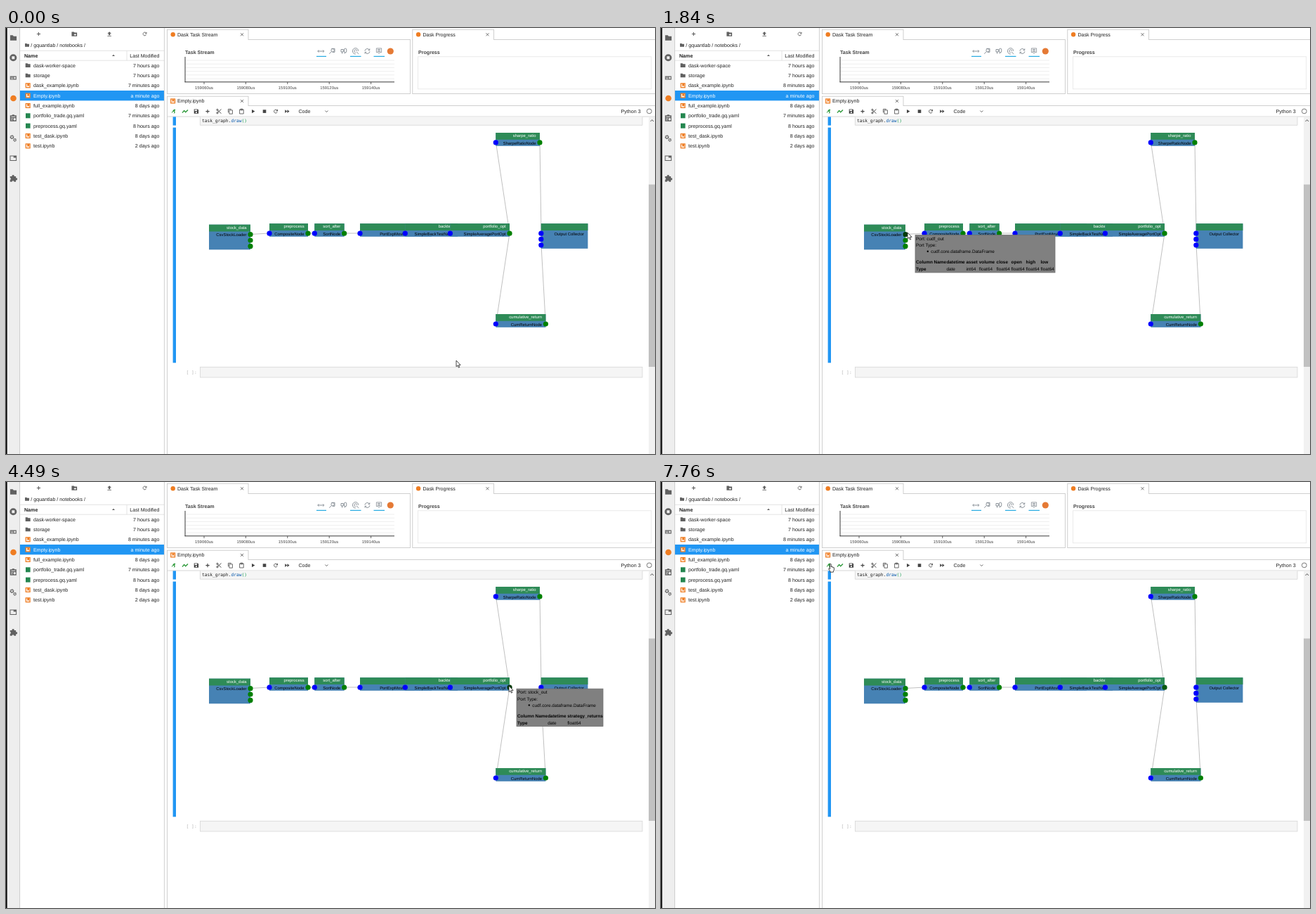
An HTML page for the animation above (8 s loop, 924x606 px).

```html
<!DOCTYPE html>
<html lang="en">
<head>
<meta charset="utf-8">
<title>Task graph notebook</title>
<style>
html, body { margin: 0; width: 100%; height: 100%; overflow: hidden; background: #fff; }
svg { display: block; width: 924px; height: 606px; }
text { font: 7.1px "Liberation Sans", Arial, sans-serif; fill: #212121; text-rendering: geometricPrecision; white-space: pre; }
.b { font-weight: bold; }
.end { text-anchor: end; }
.mono { font: 6.26px "DejaVu Sans Mono", monospace; }
.tick { font-size: 5.9px; text-anchor: middle; }
.node { font-size: 5.9px; text-anchor: end; fill: #000; }
.tip { font-size: 6.4px; fill: #000; }
</style>
</head>
<body>
<svg id="stage" viewBox="0 0 924 606" xmlns="http://www.w3.org/2000/svg"></svg>
<script>
const NS = "http://www.w3.org/2000/svg";
const stage = document.getElementById("stage");
const INK = "#616161", EDGE = "#c4c4c4", BLUE = "#2196f3", ORANGE = "#ef7d22";
const LOOP = 8000;

function el(tag, attrs, parent = stage, content) {
  const e = document.createElementNS(NS, tag);
  for (const k in attrs) e.setAttribute(k, attrs[k]);
  if (content !== undefined) e.textContent = content;
  parent.appendChild(e);
  return e;
}
const rect = (x, y, x2, y2, fill, stroke = "none", parent = stage) =>
  el("rect", { x, y, width: x2 - x, height: y2 - y, fill, stroke, "stroke-width": 0.8 }, parent);
const line = (x1, y1, x2, y2, stroke = EDGE, w = 0.8, parent = stage) =>
  el("line", { x1, y1, x2, y2, stroke, "stroke-width": w }, parent);
const dot = (cx, cy, r, fill, parent = stage) => el("circle", { cx, cy, r, fill }, parent);
const text = (x, y, s, cls = "", fill, parent = stage) =>
  el("text", fill ? { x, y, class: cls, style: "fill:" + fill } : { x, y, class: cls }, parent, s);
const group = (x, y, parent = stage) => el("g", { transform: `translate(${x} ${y})` }, parent);

// Icons are drawn around their own centre.
const icon = (x, y, d, color = INK, scale = 1, w = 0) => el("path", {
  d, transform: `translate(${x} ${y}) scale(${scale})`,
  fill: w ? "none" : color, stroke: w ? color : "none", "stroke-width": w, "fill-rule": "evenodd"
});
const FOLDER = "M-3.5-2.8H-.7L.3-1.8H3.5V2.8H-3.5Z";
const CROSS = "M-2-2 2 2M2-2-2 2";
const PLUS = "M-2.6 0H2.6M0-2.6V2.6";
const TURN = "M2.3-.8A2.4 2.4 0 1 0 2.2 1M2.5-2.6V-.6H.5";
const CARET = "M-2-1 0 1 2-1";

function notebookIcon(x, y) {
  rect(x - 2.9, y - 2.9, x + 2.9, y + 2.9, "#fff", ORANGE).setAttribute("stroke-width", 1.3);
  icon(x, y, "M-1-2.7H1.8V1.4L.4.2-1 1.4Z", ORANGE);
}

function sidebar() {
  rect(0, 0, 20, 606, "#eeeeee");
  rect(0, 0, 1.6, 606, "#000");
  line(19.6, 0, 19.6, 606);
  icon(10.5, 14, FOLDER, INK, 1.3);
  icon(10.3, 42.3, "M-5 0A5 5 0 1 1 5 0 5 5 0 1 1-5 0ZM-2-2V2H2V-2Z");
  icon(10.3, 71, "M-4.5-2.4H4.5V2.4H-4.5ZM-3.4-1.2V-.2H-2.2V-1.2ZM-1.4-1.2V-.2H-.2V-1.2ZM1-1.2V1.2H3.4V-1.2ZM-3.4.6V1.4H0V.6Z");
  dot(10.5, 100, 4.3, ORANGE);
  icon(10.3, 128.3, "M-4.5-4H-1.5V-5H1.5V-4H4.5V4.5H-4.5ZM-3-2.5V-1.5H3V-2.5ZM-3 0V1H-.5V0ZM-3 2V3H-1V2ZM2-.2A1.7 1.7 0 1 0 2 3.2 1.7 1.7 0 1 0 2-.2Z");
  el("circle", { cx: 8.5, cy: 155.2, r: 2, fill: "none", stroke: INK, "stroke-width": 1.7, "stroke-dasharray": "1.7 .4" });
  el("circle", { cx: 12.6, cy: 159.3, r: 1.6, fill: "none", stroke: INK, "stroke-width": 1.5, "stroke-dasharray": "1.4 .4" });
  icon(10.3, 185.2, "M-4.8-3.8H4.8V3.8H-4.8ZM-3.8-2.8V2.8H3.8V-.8H.4V-2.8Z");
  icon(10.3, 214, "M-4.5-3H-1.6A1.5 1.5 0 1 1 1.2-3H3.8V-.6A1.5 1.5 0 1 1 3.8 2.2V4.8H1.2A1.5 1.5 0 0 0-1.8 4.8H-4.5V2A1.5 1.5 0 0 0-4.5-.9Z");
}

let ageLabel;
function fileBrowser() {
  icon(46.5, 8.5, PLUS, INK, 1, 1.1);
  icon(97.3, 8.6, FOLDER + "M.5-.6V.4H-.5V1.2H.5V2.2H1.3V1.2H2.3V.4H1.3V-.6Z", INK, 1.1);
  icon(147.2, 8.5, "M0-3.3 2.8-.4H1.2V1.8H-1.2V-.4H-2.8ZM-2.8 2.4H2.8V3.3H-2.8Z");
  icon(197.5, 8.5, TURN, INK, 1, 0.9);
  icon(30, 24.4, FOLDER, INK, 0.85);
  text(35.3, 27, "/ gquantlab / notebooks /");
  line(20, 32.3, 225, 32.3, "#ddd");
  line(20, 46.2, 225, 46.2, "#ddd");
  line(172, 32.3, 172, 46.2, "#ddd");
  text(26, 41.7, "Name", "b");
  icon(153, 39, "M-2 1 0-1.2 2 1Z");
  text(218.5, 41.7, "Last Modified", "end");
  const files = [
    ["dask-worker-space", "7 hours ago", "dir"], ["storage", "7 hours ago", "dir"],
    ["dask_example.ipynb", "7 minutes ago"], ["Empty.ipynb", "a minute ago"],
    ["full_example.ipynb", "8 days ago"], ["portfolio_trade.gq.yaml", "7 minutes ago", "yaml"],
    ["preprocess.gq.yaml", "8 hours ago", "yaml"], ["test_dask.ipynb", "8 days ago"],
    ["test.ipynb", "2 days ago"]
  ];
  files.forEach(([name, age, kind], i) => {
    const y = 53.1 + i * 14.34, on = i === 3;
    if (on) rect(20, y - 7.1, 225, y + 7.2, BLUE);
    if (kind === "dir") icon(31.2, y, FOLDER);
    else if (kind === "yaml") rect(28, y - 3.5, 34.6, y + 3.5, "#24864f");
    else notebookIcon(31.2, y);
    text(39, y + 2.5, name, "", on ? "#fff" : undefined);
    const label = text(218.5, y + 2.5, age, "end", on ? "#fff" : undefined);
    if (i === 2) ageLabel = label;
  });
  line(225.4, 0, 225.4, 606);
}

function tab(x, y, x2, y2, title, mark) {
  rect(x, y, x2, y2, "#fff", EDGE);
  line(x + 0.4, y2, x2 - 0.4, y2, "#fff", 1.2);
  const mid = (y + y2) / 2;
  if (mark) dot(x + 8.3, mid, 3.2, ORANGE); else notebookIcon(x + 8.2, mid);
  text(x + 14.6, mid + 2.5, title);
  icon(x2 - 9, mid, CROSS, INK, 1, 0.9);
}

function taskStream() {
  rect(229.4, 16.4, 575.4, 93.6, "#fff", EDGE);
  tab(229.4, 2.2, 345, 16.4, "Dask Task Stream", true);
  text(255, 36.7, "Task Stream", "b", "#444");
  for (let y = 46; y < 74; y += 5.2) line(255, y, 553, y, "#e8e8e8", 0.7);
  line(255, 41, 255, 77.2, "#222", 0.9);
  line(254.6, 76.8, 553, 76.8, "#222", 0.9);
  for (let i = 0; i < 5; i++) {
    const x = 282 + i * 59.4;
    line(x, 77, x, 80, "#222", 0.7);
    text(x, 86.7, 159060 + i * 20 + "us", "tick", "#444");
  }
  for (const [a, b] of [[442, 456], [490, 505.5], [523.5, 539]]) line(a, 40.4, b, 40.4, "#26aae1", 1.2);
  const tool = "#808890";
  icon(448.3, 33, "M-4.5 0H4.5M-2.8-1.7-4.5 0-2.8 1.7M2.8-1.7 4.5 0 2.8 1.7", tool, 1, 0.9);
  icon(464.3, 33, "M-1-3.7H3.7V1.4H.5M3-1.2A2.2 2.2 0 1 0-1.4-1.2 2.2 2.2 0 1 0 3-1.2M-1 .5-4 3.8", tool, 1, 0.9);
  icon(481, 33, "M-4-2.5H-.8V1H-4ZM-2.4 1V3.7M3.8-1A1.7 2.4 0 1 0 .5-1 1.7 2.4 0 1 0 3.8-1M2 1.4 1 3.5", tool, 1, 0.9);
  icon(497.8, 32.8, "M4 0A4.2 4.2 0 1 0 0 4.2M2 0A2 2 0 1 0 0 2M1 1 4.5 4.2", tool, 1, 0.9);
  icon(514.4, 33, "M-3.5-.3A3.5 3.5 0 0 1 3-1.8M3.5.3A3.5 3.5 0 0 1-3 1.8M3.4-3.6V-1.4H1.2M-3.4 3.6V1.4H-1.2", tool, 1, 0.9);
  icon(531, 32.5, "M-3.6-3.6H3.6V2.2H1.2L0 3.7-1.2 2.2H-3.6ZM-2-1.9H2M-2-.5H2M-2 .9H2", tool, 1, 0.8);
  dot(547.3, 33, 4.6, "#e57a35");
}

function progressPanel() {
  rect(578.8, 16.4, 926, 93.6, "#fff", EDGE);
  tab(578.8, 2.2, 694.5, 16.4, "Dask Progress", true);
  text(587, 36.7, "Progress", "b", "#444");
  rect(586.4, 40.8, 918.7, 86.8, "#fff", "#e5e5e5");
}

function notebook() {
  rect(229.4, 110.6, 926, 608, "#fff", EDGE);
  tab(229.4, 97.2, 345, 110.6, "Empty.ipynb", false);
  line(229.4, 126, 924, 126, "#ccc");
  const y = 118.6;
  icon(239, y, "M.4-3.2 2.6-2.2.8-.4 2 .6.8 3H-.2L.5 1-1 0-2.8 2.6-3 1.4-1.4-1.2Z", "#2f9a3c");
  icon(255, y, "M-4 2-1.4-1 .7 1.2 4-2.2", "#2f9a3c", 1, 1.4);
  icon(270.9, y, "M-3.2-3.2H2L3.2-2V3.2H-3.2ZM-2.2-2.4V-.7H1.2V-2.4ZM0 .3A1.1 1.1 0 1 0 0 2.5 1.1 1.1 0 1 0 0 .3Z", "#444");
  icon(287, y, PLUS, "#444", 1, 1.1);
  icon(303.3, y, "M-2.2-1.7 3.2 3M-2.2 1.7 3.2-3M-1.3-2.2A1.1 1.1 0 1 0-3.5-2.2 1.1 1.1 0 1 0-1.3-2.2M-1.3 2.2A1.1 1.1 0 1 0-3.5 2.2 1.1 1.1 0 1 0-1.3 2.2", "#444", 1, 0.9);
  icon(319.4, y, "M-3 1.8V-3.2H1.4M-1.5-1.7H3V3.6H-1.5Z", "#444", 1, 0.8);
  icon(335.4, y, "M-2.8-2.6H2.8V3.4H-2.8ZM-1.4-3.4H1.4V-1.8H-1.4Z", "#444", 1, 0.8);
  icon(352, y, "M-2-2.7 2.4 0-2 2.7Z", "#444");
  icon(368, y, "M-2.3-2.3H2.3V2.3H-2.3Z", "#444");
  icon(384, y, TURN, "#444", 1, 0.9);
  icon(400.2, y, "M-3-2.3 0 0-3 2.3ZM.2-2.3 3.3 0 .2 2.3Z", "#444");
  text(416.4, 121.1, "Code");
  icon(456.4, y, CARET, "#555", 1, 0.9);
  text(903.6, 121.1, "Python 3", "end");
  el("circle", { cx: 915.8, cy: 118.4, r: 3.4, fill: "#fff", stroke: "#555", "stroke-width": 0.8 });

  rect(237.6, 126.4, 242, 138.6, BLUE);
  rect(237.6, 141.6, 242, 476.3, BLUE);
  rect(276.4, 126.4, 906, 138.3, "#f5f5f5");
  el("path", { d: "M276.4 126.4V138.3H906V126.4", fill: "none", stroke: "#d6d6d6", "stroke-width": 0.8 });
  const code = text(279, 133.7, "task_graph.", "mono");
  el("tspan", { fill: "#0055aa" }, code, "draw");
  el("tspan", { fill: "#159a50" }, code, "()");
  text(256.6, 492, "[ ]:", "mono", "#b0b0b0");
  rect(276.4, 482.3, 906, 497, "#f5f5f5", "#d6d6d6");
  rect(915, 126.4, 924, 606, "#f1f1f1");
  rect(915, 222.6, 924, 482, "#c1c1c1");
  icon(919.8, 131.8, "M-2.3 1.2 0-1.2 2.3 1.2", "#555", 1, 1);
}

const port = (x, y, fill) => dot(x, y, 3.6, fill);
function node(x, y, x2, y2, title, kind, ins, outs, textX = x2 - 5.4) {
  const base = y + (y2 - y > 25 && title ? 4 : 0) * 0;
  rect(x, y, x2, y2, "#4682b4");
  rect(x, y, x2, y + 9.8, "#2e8b57");
  const labels = [text(textX, base + 6.2, title, "node", "#fff"), text(textX, base + 16.5, kind, "node")];
  ins.forEach(py => port(x, py, "#0000ff"));
  const ports = outs.map(py => port(x2, py, "#008000"));
  return { labels, ports };
}

let opt, source, optFrame;
function graph() {
  const links = [[348, 293.5, 375, 292], [430, 292, 439, 292], [482, 292, 504, 292],
    [717, 292, 697.5, 163], [717, 292, 697.5, 421], [760, 163, 762, 292], [768.3, 421, 762, 308.5]];
  links.forEach(p => line(...p, "#b0b0b0", 0.8));
  source = node(289, 279.7, 348, 315.3, "stock_data", "CsvStockLoader", [], [293.7, 302, 310.4]);
  node(375, 278.2, 430, 296.8, "preprocess", "CompositeNode", [292.2], [292.2]);
  node(439.3, 278.2, 481.6, 296.8, "sort_after", "SortNode", [292.2], [292.2]);
  node(504, 278.2, 606, 296.8, "", "PortExpMovingAverageNode", [292.2], [], 608);
  node(568.3, 278.2, 643, 296.8, "backtest", "SimpleBackTestNode", [292.2], []);
  opt = node(632.4, 278.2, 717, 296.8, "portfolio_opt", "SimpleAveragePortOpt", [292.2], [292.2]);
  optFrame = rect(632.4, 278.2, 717, 296.8, "none", "#e00000");
  node(697.3, 149, 760, 167.8, "sharpe_ratio", "SharpeRatioNode", [162.9], [162.9]);
  node(697.3, 407, 768.4, 425.8, "cumulative_return", "CumReturnNode", [421], [421]);
  node(761.8, 278.2, 828.4, 313.8, "", "Output Collector", [292.2, 300.4, 308.8], []);
}

function tooltip(x, y, w, portName, columns) {
  const g = group(x, y);
  rect(0, 0, w, 53.3, "#808080", "#6e6e6e", g);
  const put = (tx, ty, s, bold) => text(tx, ty, s, bold ? "tip b" : "tip", undefined, g);
  put(1, 7.3, "Port: " + portName);
  put(1, 16.5, "Port Type:");
  dot(17.8, 23.2, 1.2, "#000", g);
  put(22.3, 25.6, "cudf.core.dataframe.DataFrame");
  put(1, 40.6, "Column Name", true);
  put(1, 50.6, "Type", true);
  columns.forEach(([cx, name, type]) => {
    put(cx, 40.6, name, true);
    put(cx, 50.6, type);
  });
  return g;
}

sidebar();
fileBrowser();
taskStream();
progressPanel();
notebook();
graph();
const sourceTip = tooltip(362, 294.6, 199, "cudf_out", [
  [44.4, "datetime", "date"], [72.4, "asset", "int64"],
  ...["volume", "close", "open", "high", "low"].map((n, i) => [i ? 94.6 + i * 21 : 90.8, n, "float64"])
]);
const optTip = tooltip(727, 294.2, 123, "stock_out", [[44.2, "datetime", "date"], [72.3, "strategy_returns", "float64"]]);

const arrow = group(0, 0), hand = group(0, 0);
const pointer = { fill: "#fff", stroke: "#111", "stroke-width": 0.75, "stroke-linejoin": "round" };
el("path", { ...pointer, d: "M0 0V8.7L2 6.9 3.4 10.1 4.8 9.5 3.4 6.4H6.1Z" }, arrow);
el("path", { ...pointer, d: "M-.9.8A.8.8 0 0 1 .8.8V4.3L1 3.7 2.3 4V4.7L3.5 4.4 3.8 5.2 4.9 5.3V8.6L3.9 10.3V11.7H-.6V10.4L-3 7.2-2.4 6.2-.9 7.4Z" }, hand);

// Bursts of pointer travel: start, end, number of steps, waypoints.
const moves = [
  [0, 0, 1, [[641, 473]]],
  [440, 1220, 11, [[637, 470], [570, 434], [470, 380], [400, 343], [371, 327]]],
  [1300, 1840, 8, [[367, 319], [361, 310], [355, 301], [351.3, 295], [351, 293], [351, 291.5], [351, 291], [351, 291]]],
  [3090, 3870, 11, [[365, 303], [420, 343], [530, 384], [655, 370], [715, 324]]],
  [3950, 4490, 8, [[716, 312], [716, 306], [716.3, 301.5], [715, 299], [713, 295], [713, 293], [715, 291], [716, 290]]],
  [6040, 6820, 11, [[699.5, 292.3], [640, 328], [540, 349], [420, 300], [345, 228], [320, 200]]],
  [6900, 7680, 11, [[314, 194], [286, 166], [257, 135], [240, 117]]],
  [7760, 7760, 1, [[241.5, 116.5]]]
];

function along(pts, s) {
  const last = pts.length - 1, f = s * last, i = Math.min(Math.floor(f), Math.max(last - 1, 0)), u = f - i;
  const at = k => pts[Math.max(0, Math.min(last, k))];
  return [0, 1].map(c => {
    const [a, b, d, e] = [at(i - 1)[c], at(i)[c], at(i + 1)[c], at(i + 2)[c]];
    return b + 0.5 * u * (d - a + u * (2 * a - 5 * b + 4 * d - e + u * (3 * (b - d) + e - a)));
  });
}

function pointerAt(t) {
  const [start, end, steps, pts] = moves.filter(m => m[0] <= t).pop();
  if (steps === 1) return pts[0];
  const k = Math.min(steps - 1, Math.floor((t - start) * (steps - 1) / (end - start) + 0.001));
  return along(pts, k / (steps - 1));
}

const show = (e, on) => e.setAttribute("display", on ? "inline" : "none");
const within = (t, a, b) => t >= a && t < b;

function draw(t) {
  const [x, y] = pointerAt(t);
  const nodeHover = within(t, 4255, 4490) || within(t, 6040, 6118);
  const onSource = within(t, 1680, 3090), onOpt = within(t, 4490, 6040);
  const useHand = nodeHover || t >= 7760;
  for (const c of [arrow, hand]) c.setAttribute("transform", `translate(${x} ${y})`);
  show(arrow, !useHand);
  show(hand, useHand);
  show(sourceTip, onSource);
  show(optTip, onOpt);
  show(optFrame, nodeHover);
  opt.labels.forEach((l, i) => { l.style.fill = nodeHover ? "#e00000" : i ? "#000" : "#fff"; });
  source.ports[0].setAttribute("fill", onSource ? "#033b08" : "#008000");
  opt.ports[0].setAttribute("fill", onOpt ? "#033b08" : t >= 6040 ? "#075a0d" : "#008000");
  ageLabel.textContent = (t < 1300 ? 7 : 8) + " minutes ago";
}

const begin = performance.now();
function tick() {
  draw((performance.now() - begin) % LOOP);
  requestAnimationFrame(tick);
}
draw(0);
requestAnimationFrame(tick);
</script>
</body>
</html>
```
